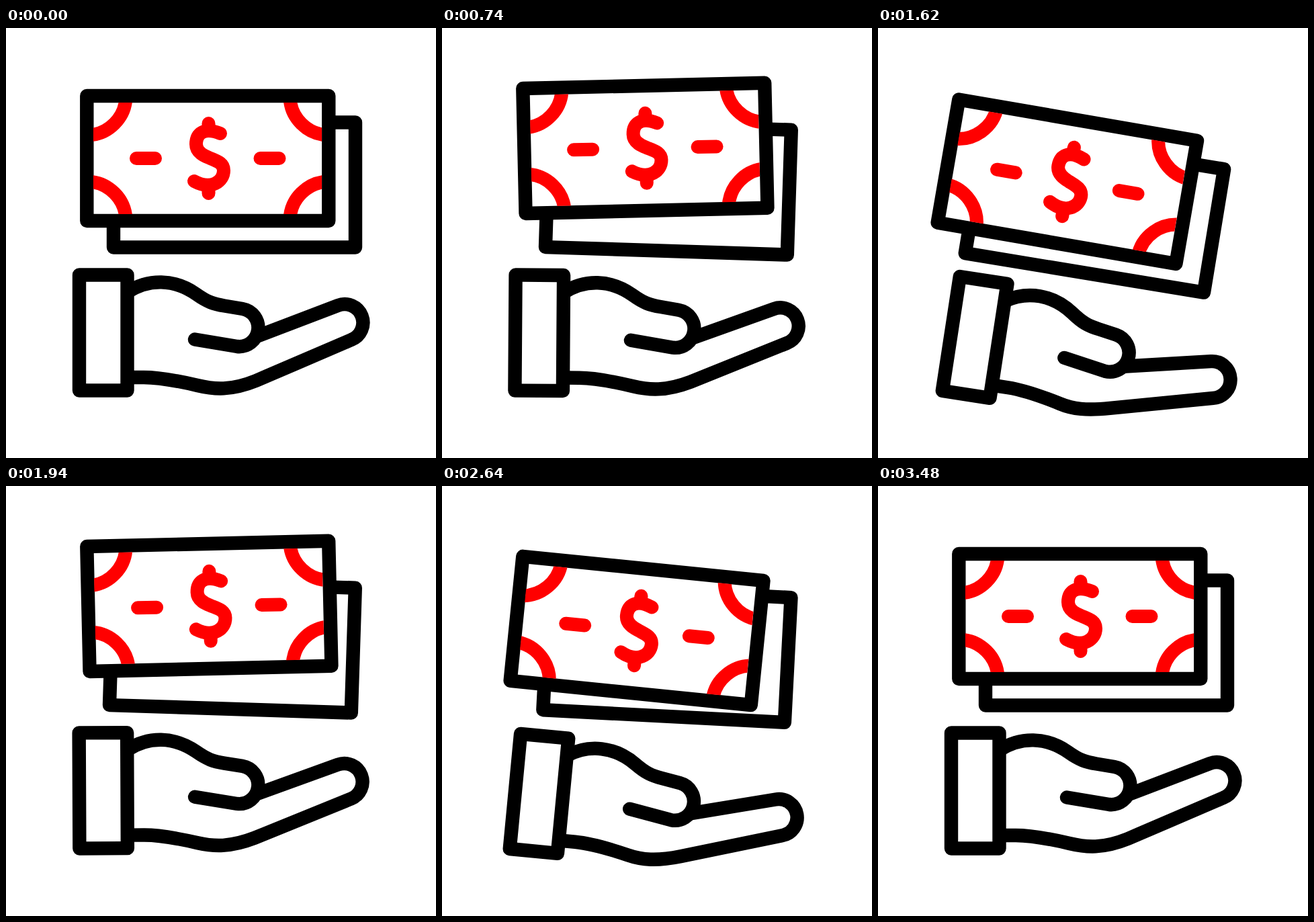
An HTML page without scripts for the animation above (3.6 s loop, 640 px wide and 640 px high).

```html
<!DOCTYPE html>
<html lang="en">
<head>
<meta charset="utf-8">
<title>Hand with banknotes</title>
<style>
  html, body { margin: 0; width: 100%; height: 100%; overflow: hidden; background: #fff; }
  svg { display: block; width: 100vw; height: 100vh; }

  .line { fill: none; stroke: #000; stroke-width: 20.4; stroke-linecap: round; stroke-linejoin: round; }
  .paper { fill: #fff; }
  .ink { fill: none; stroke: #f00; stroke-width: 20; stroke-linecap: round; }

  /* Every part shares one rhythm; the delays stagger them. */
  .note, .hand, .finger {
    --ease: cubic-bezier(.37, 0, .63, 1);
    animation: 3.6s var(--ease) infinite backwards;
  }
  .note { animation-name: bob, swing; }
  .back {
    transform-origin: 160px 140px;
    --down: 9.8deg; --up: -10.2deg; --low: 11.2px; --high: -9.7px;
    animation-delay: 60ms, 120ms;
  }
  .front {
    transform-origin: 120px 101px;
    --down: 9.8deg; --up: -10.2deg; --low: 6px; --high: -18px;
    animation-delay: 0ms, 60ms;
  }
  .hand { transform-origin: 99px 453px; animation-name: tilt; animation-delay: 60ms; }
  .finger { animation-name: bend; animation-delay: 60ms; }

  @keyframes swing {
    0%, 93.333%, 100% { rotate: 0deg; }
    10%, 43.333%, 76.667% { rotate: var(--down); }
    26.667%, 60% { rotate: var(--up); }
  }
  @keyframes bob {
    0%, 93.333%, 100% { translate: 0 0; }
    10%, 43.333%, 76.667% { translate: 0 var(--low); }
    26.667%, 60% { translate: 0 var(--high); }
  }
  @keyframes tilt {
    0%, 93.333%, 100% { rotate: 0deg; }
    10%, 43.333%, 76.667% { rotate: 8.7deg; }
    76.667% { animation-timing-function: cubic-bezier(.3, 0, .45, 1); }
    26.1% { rotate: -5.5deg; }
    60% { rotate: -7.4deg; }
  }
  @keyframes bend {
    0%, 93.333%, 100% {
      d: path("M376 458 L494 413 A27 27 0 0 1 514 464 L372 525 C335 540 310 538 285 532 C255 525 230 520 205 520 L181 520");
    }
    10%, 43.333%, 76.667% {
      d: path("M374 462 L497.4 435.7 A27 27 0 0 1 509.2 489.2 L359.5 527.4 C325 536.2 305 537 285 532 C255 525 230 520 205 520 L181 520");
    }
    76.667% { animation-timing-function: cubic-bezier(.3, 0, .42, 1); }
    26.1%, 60% {
      d: path("M377 456 L491 401 A27 27 0 0 1 516 450 L378 523 C340 541 312 538 285 532 C255 525 230 520 205 520 L181 520");
    }
  }
</style>
</head>
<body>
<svg viewBox="0 0 640 640">
  <defs>
    <clipPath id="inside"><rect x="130" y="111" width="340" height="166"/></clipPath>
  </defs>

  <g class="hand">
    <path class="line finger" d="M376 458 L494 413 A27 27 0 0 1 514 464 L372 525 C335 540 310 538 285 532 C255 525 230 520 205 520 L181 520"/>
    <path class="line" d="M181 393 C212 373 250 373 283 396 C300 408 309 411 325 413.500 L352 418 A28.300 28.300 0 0 1 344 474 L281 463.500"/>
    <rect class="line paper" x="109" y="367.500" width="71.500" height="172"/>
  </g>

  <g class="note back">
    <rect class="line paper" x="160" y="140.500" width="360" height="186"/>
  </g>

  <g class="note front">
    <rect class="line paper" x="120.300" y="101" width="360" height="186"/>
    <g class="ink">
      <g clip-path="url(#inside)">
        <circle cx="120" cy="101" r="58.500"/>
        <circle cx="481" cy="101" r="58.500"/>
        <circle cx="120" cy="287" r="58.500"/>
        <circle cx="481" cy="287" r="58.500"/>
      </g>
      <path d="M194 194 h28 M378.500 194 h28"/>
      <path d="M301.500 142 v10 M301.500 236 v10"/>
      <path d="M319 157 C295 147 283 157 283 173 C283 186 297 191 303 193.500 C314 198 324 201 324 212 C324 228 306 242 280 228"/>
    </g>
  </g>
</svg>
</body>
</html>
```
